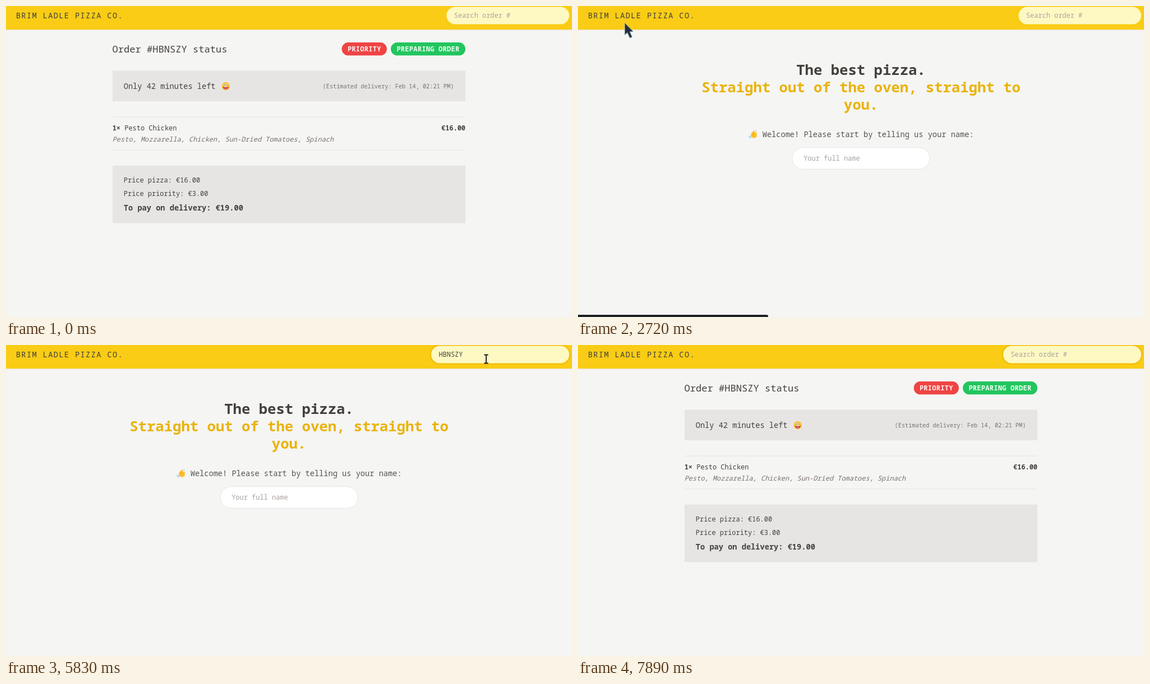
An HTML page for the animation above (7960 ms loop, 1009 by 555 pixels).

```html
<!DOCTYPE html>
<html lang="en">
<head>
<meta charset="utf-8">
<title>Pizza order status</title>
<style>
  html, body { margin: 0; width: 100%; height: 100%; overflow: hidden; background: #f5f5f4; }
  svg { position: absolute; left: 0; top: 0; display: block; }
  text {
    font-family: "Noto Sans Mono", "Liberation Mono", monospace;
    font-size: 13.67px; fill: #44403c; white-space: pre;
  }
  .xs { font-size: 10.25px; fill: #78716c; }
  .sm { font-size: 11.96px; }
  .xl { font-size: 17.08px; font-weight: 500; }
  .huge { font-size: 25.62px; font-weight: 600; text-anchor: middle; }
  .bold { font-weight: 600; }
  .end { text-anchor: end; }
  .brand { letter-spacing: 1.367px; }
  .badge { font-size: 11.96px; font-weight: 600; letter-spacing: .3px; }
  .gold { fill: #eab308; }
  .hint { fill: #a8a29e; }
  .italic { font-style: italic; fill: #78716c; }
  .panel { fill: #e7e5e4; }
  #veil {
    position: absolute; left: 0; top: 0; width: 1009px; height: 555px;
    background: rgba(226, 232, 240, .2);
    -webkit-backdrop-filter: blur(2.2px); backdrop-filter: blur(2.2px);
  }
  #veil i { position: absolute; width: 7.7px; height: 25.6px; background: #292524; }
</style>
</head>
<body>
<svg width="1009" height="555" viewBox="0 0 1009 555">
  <rect width="1009" height="555" fill="#f5f5f4"/>
  <rect width="1009" height="42.4" fill="#facc15"/>
  <rect y="42.4" width="1009" height=".9" fill="#e7e5e4"/>
  <text class="brand" x="17.8" y="22.3">BRIM LADLE PIZZA CO.</text>

  <rect id="ring" y=".2" height="33.6" rx="16.8" fill="none" stroke="#eab308" stroke-width="2.6"/>
  <rect id="field" y="1.5" height="31" rx="15.5" fill="#fef9c3"/>
  <text id="query" class="sm" y="21.3"></text>
  <rect id="caret" y="9" width="1" height="16" fill="#292524"/>

  <g id="order">
    <text class="xl" x="189.5" y="83">Order #HBNSZY status</text>
    <rect x="598.6" y="65" width="80.3" height="23.3" rx="11.65" fill="#ef4444"/>
    <text class="badge" x="608.9" y="81.3" style="fill:#fef2f2">PRIORITY</text>
    <rect x="686" y="65" width="133" height="23.3" rx="11.65" fill="#22c55e"/>
    <text class="badge" x="696.4" y="81.3" style="fill:#f0fdf4">PREPARING ORDER</text>

    <rect class="panel" x="190" y="115.5" width="629" height="54.5"/>
    <text x="209.7" y="148" style="font-weight:500">Only 42 minutes left</text>
    <g transform="translate(391.8 143.2)">
      <circle r="7.2" fill="#fbc02d"/>
      <path d="M-5 .3H5A5 5.4 0 0 1-5 .3z" fill="#b3262e"/>
      <path d="M-4 .3H4V1.6H-4z" fill="#fff"/>
      <ellipse cy="4" rx="2.6" ry="1.5" fill="#f06a80"/>
      <circle cx="-2.8" cy="-2.4" r="1.8" fill="#fff"/>
      <circle cx="2.8" cy="-2.4" r="1.8" fill="#fff"/>
      <circle cx="-2.8" cy="-2.4" r=".9" fill="#4e342e"/>
      <circle cx="2.8" cy="-2.4" r=".9" fill="#4e342e"/>
    </g>
    <text class="xs end" x="798.3" y="147.2">(Estimated delivery: Feb 14, 02:21 PM)</text>

    <rect class="panel" x="190" y="197.5" width="629" height="1"/>
    <text class="sm" x="189.7" y="221.5"><tspan class="bold">1×</tspan> Pesto Chicken</text>
    <text class="sm bold end" x="819" y="221.5">€16.00</text>
    <text id="toppings" class="sm italic" x="189.7" y="242.2"></text>
    <rect class="panel" x="190" y="256.5" width="629" height="1"/>

    <rect class="panel" x="190" y="284.7" width="629" height="102.8"/>
    <text class="sm" x="209.8" y="314.8">Price pizza: €16.00</text>
    <text class="sm" x="209.8" y="338.8">Price priority: €3.00</text>
    <text class="bold" x="209.8" y="365">To pay on delivery: €19.00</text>
  </g>

  <g id="home">
    <text class="huge" x="504.5" y="123.3">The best pizza.</text>
    <text class="huge gold" x="504.5" y="154">Straight out of the oven, straight to</text>
    <text class="huge gold" x="504.5" y="184.8">you.</text>
    <g transform="translate(304 221.5)">
      <path d="M5 5.5L8.6 1.4Q10 .6 10.6 2L13.4 6V4.4Q14.6 3.4 14.8 5V10.6Q13.6 14.6 9 14.3Q5.6 13.6 3.8 9z" fill="#fbc02d"/>
      <path d="M6 7L8.5 10.2M8 5L10.6 8.4" stroke="#e59600" stroke-width=".8"/>
      <path d="M.6 10Q1 13.6 4.4 14.2M3 10.4Q3.2 12 5 12.6M11.4 .8Q13.6 .8 14.2 2.6" fill="none" stroke="#8fc1d4" stroke-width="1.1"/>
    </g>
    <text x="328.7" y="233.6" style="fill:#57534e">Welcome! Please start by telling us your name:</text>
    <rect x="381.9" y="252.7" width="245.4" height="38.6" rx="19.3" fill="#fff" stroke="#e7e5e4"/>
    <text class="sm hint" x="402.2" y="276.3">Your full name</text>
  </g>

  <path id="link" d="M0 551H336Q339 551 339 554V555H0z" fill="#202124"/>
</svg>

<div id="veil"><i></i><i></i><i></i></div>

<svg width="1009" height="555" viewBox="0 0 1009 555">
  <g id="arrow">
    <path d="M.5 .5V21.5L5 17.5L9.5 27L13.4 25.2L9.2 16L15 15.3z" fill="#22303f" stroke="#7f98a8" stroke-linejoin="round"/>
  </g>
  <g id="hand">
    <path d="M5 1.5Q7 0 8 2V9L14.5 10.5Q16.5 11 16.3 13.5L15 22H6L1 14Q1.5 11.5 4.8 14z" fill="#22303f" stroke="#7f98a8" stroke-linejoin="round"/>
  </g>
  <g id="beam">
    <path d="M-3.5-7.5H-1L0-6.8L1-7.5H3.5M-3.5 7.5H-1L0 6.8L1 7.5H3.5M0-7V7" fill="none" stroke="#111" stroke-width="1.8"/>
  </g>
</svg>

<script>
const LOOP = 7960, TICK = 71.7;
const HOME = 2110, FOCUS = 3540, PASTE = 4170, SUBMIT = 5970, DONE = 6330, LOADED = 6870;
const $ = id => document.getElementById(id);

// start, end, cursor shape, one point per step
const moves = [
  [930, 1290, "arrow", [543, 541], [198, 436], [79, 390], [63, 333], [70, 305], [76, 295]],
  [1490, 1770, "arrow", [69, 265], [54, 235], [20, 122], [25, 67], [44, 45]],
  [1840, 1840, "hand", [75, 22]],
  [2040, 2040, "hand", [77, 11]],
  [2720, 3270, "arrow", [83, 30], [230, 120], [480, 212], [730, 212], [880, 195], [905, 180], [895, 140], [872, 75], [862, 34]],
  [3340, 3340, "beam", [868, 30]],
  [3540, 3540, "beam", [870, 22]],
  [5630, 5630, "beam", [856, 25]],
  [SUBMIT, SUBMIT, "arrow", [857, 24]],
  [DONE, DONE, "beam", [856, 25]],
  [7200, 7890, "arrow", [850, 35], [800, 60], [720, 95], [675, 130], [760, 160], [853, 200], [900, 280], [923, 362], [963, 515], [968, 600]]
];

// times at which the text caret turns on or off
const blinks = [FOCUS, 4770, 5300, 5830, SUBMIT, 6650, 7200, 7710];

// loader bar offsets at every fifth of a second
const bars = [
  [.5, 0, 1, .5, .5, .5],
  [.5, .5, 0, 1, .5, .5],
  [.5, .5, .5, 0, 1, .5]
];

const show = (id, on) => { $(id).style.display = on ? "" : "none"; };

function ease(x) {
  // cubic-bezier(.4, 0, .2, 1)
  x = Math.min(1, Math.max(0, x));
  let lo = 0, hi = 1, s = x;
  for (let i = 0; i < 20; i++) {
    s = (lo + hi) / 2;
    const px = 1.2 * s * (1 - s) ** 2 + .6 * s * s * (1 - s) + s ** 3;
    if (px < x) lo = s; else hi = s;
  }
  return 3 * s * s * (1 - s) + s ** 3;
}

function drawCursor(t) {
  const move = moves.filter(m => m[0] <= t).pop();
  for (const id of ["arrow", "hand", "beam"]) show(id, move && move[2] === id);
  if (!move) return;
  const [from, to, id, ...pts] = move;
  const last = pts.length - 1;
  const i = last ? Math.min(last, Math.floor((t - from) / (to - from) * last + .05)) : 0;
  $(id).setAttribute("transform", `translate(${pts[i]})`);
}

function drawSearch(t) {
  const steps = Math.floor((t - FOCUS) / TICK + .05);
  const k = t < FOCUS ? 0 : ease((steps + .5) * TICK / 300);
  const x = 785.4 - 27.4 * k, w = 1004 - x;
  $("field").setAttribute("x", x);
  $("field").setAttribute("width", w);
  $("ring").setAttribute("x", x - 1.3);
  $("ring").setAttribute("width", w + 2.6);
  $("ring").setAttribute("stroke-opacity", k * .5);
  const typed = t >= PASTE && t < SUBMIT;
  const query = $("query");
  query.textContent = typed ? "HBNSZY" : "Search order #";
  query.classList.toggle("hint", !typed);
  query.setAttribute("x", x + 13.4);
  show("caret", blinks.filter(b => b <= t).length % 2);
  $("caret").setAttribute("x", typed ? 814 : x + 13.2);
}

function drawLoader(t) {
  const on = t >= SUBMIT && t < DONE;
  show("veil", on);
  if (!on) return;
  const step = Math.floor((t - SUBMIT) / 70 + .01);
  const phase = (37 + Math.min(4, step) * 70) / 200;
  const i = Math.floor(phase), f = phase - i;
  document.querySelectorAll("#veil i").forEach((bar, n) => {
    const pos = bars[n][i] + (bars[n][i + 1] - bars[n][i]) * f;
    bar.style.left = 492.5 + n * 15.35 + "px";
    bar.style.top = 254.7 + pos * 25.6 + "px";
  });
}

function draw(t) {
  const home = t >= HOME && t < DONE;
  show("home", home);
  show("order", !home);
  show("link", t >= 2040 && t < 3000);
  $("toppings").textContent = t >= DONE && t < LOADED
    ? "Loading..."
    : "Pesto, Mozzarella, Chicken, Sun-Dried Tomatoes, Spinach";
  drawSearch(t);
  drawLoader(t);
  drawCursor(t);
}

const start = performance.now();
function frame() {
  draw((performance.now() - start) % LOOP);
  requestAnimationFrame(frame);
}
frame();
</script>
</body>
</html>
```
